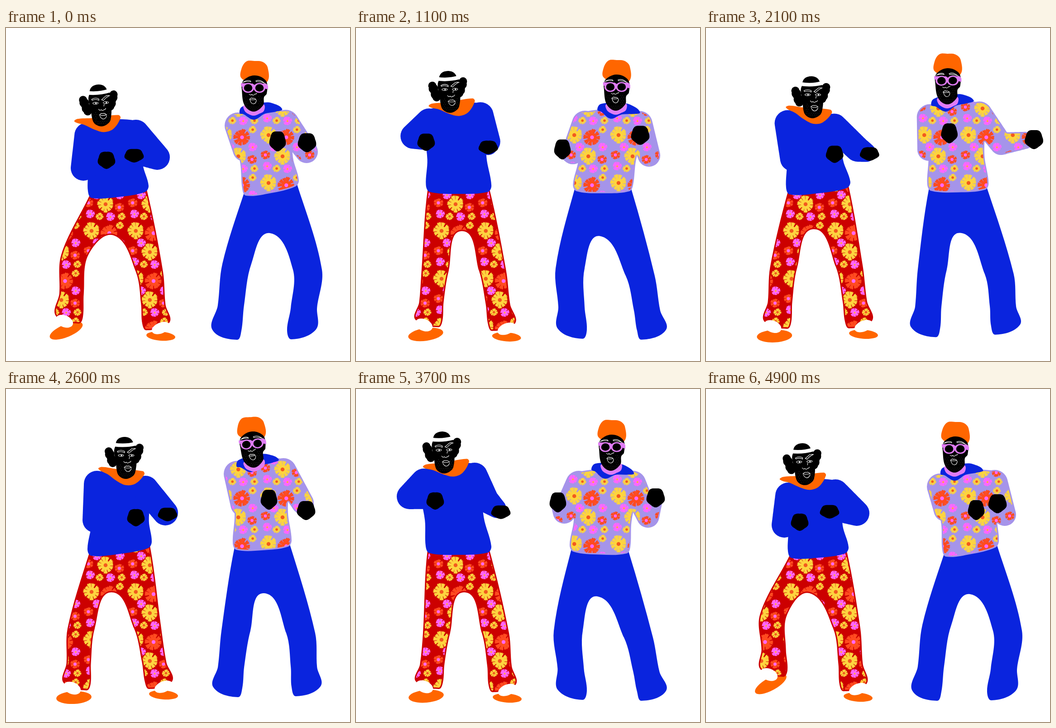
Animation of 760x737 px, one loop 5 s. Source, as an HTML page with a canvas:

```html
<!DOCTYPE html>
<html lang="en">
<head>
<meta charset="utf-8">
<title>Two dancers</title>
<style>
html, body { margin: 0; width: 100%; height: 100%; overflow: hidden; background: #fff; }
canvas { display: block; }
</style>
</head>
<body>
<canvas id="stage" width="760" height="737"></canvas>
<script>
const W = 760, H = 737, TAU = Math.PI * 2;
const ctx = document.getElementById('stage').getContext('2d');
const BLUE = '#0a24de', RED = '#cc0000', LILAC = '#a594ea', ORANGE = '#ff6600',
  YELLOW = '#fdd43f', CORAL = '#ff4b20', PINK = '#ff66ff', ORCHID = '#e07cf5';

// Each dancer is a skeleton: joint -> [[step, [x, y, tilt]], ...]. 0 is the left side, 1 the right.
const one = {}, two = {};
function pose(dancer, step, joints) {
  for (const name in joints) (dancer[name] = dancer[name] || []).push([step, joints[name]]);
}

pose(one, 0, {
  head: [207, 171, -.06], collar: [202, 202, -.12],
  shoulder0: [180, 238], elbow0: [171, 310], hand0: [222, 292],
  shoulder1: [287, 232], elbow1: [334, 286], hand1: [283, 282],
  waist0: [181, 373], waist1: [315, 361], crotch: [238, 459],
  knee0: [152, 502], ankle0: [140, 645], knee1: [317, 540], ankle1: [331, 660]
});
pose(one, 1, {
  head: [215, 166, -.05], collar: [214, 195, -.13],
  shoulder0: [182, 236], elbow0: [173, 301], hand0: [207, 294],
  shoulder1: [286, 229], elbow1: [333, 275], hand1: [273, 271],
  waist0: [181, 371], waist1: [315, 362], crotch: [229, 452],
  knee0: [149, 500], ankle0: [150, 628], knee1: [311, 530], ankle1: [325, 660]
});
pose(one, 6, {
  head: [248, 148, 0], collar: [240, 174, -.12],
  shoulder0: [205, 221], elbow0: [165, 251], hand0: [128, 279],
  shoulder1: [302, 203], elbow1: [314, 276], hand1: [240, 244],
  waist0: [159, 359], waist1: [301, 362], crotch: [223, 447],
  knee0: [161, 520], ankle0: [155, 642], knee1: [291, 525], ankle1: [320, 660]
});
pose(one, 13, {
  head: [192, 140, -.03], collar: [199, 166, -.16],
  shoulder0: [150, 205], elbow0: [118, 238], hand0: [175, 247],
  shoulder1: [262, 192], elbow1: [287, 245], hand1: [320, 272],
  waist0: [154, 360], waist1: [299, 360], crotch: [239, 450],
  knee0: [178, 540], ankle0: [162, 655], knee1: [308, 540], ankle1: [323, 662]
});
pose(one, 17, {
  head: [188, 154, 0], collar: [185, 178, .07],
  shoulder0: [149, 212], elbow0: [173, 285], hand0: [273, 264],
  shoulder1: [245, 210], elbow1: [300, 254], hand1: [368, 280],
  waist0: [168, 363], waist1: [310, 357], crotch: [245, 438],
  knee0: [180, 530], ankle0: [161, 655], knee1: [322, 525], ankle1: [337, 658]
});
pose(one, 24, {
  head: [263, 152, 0], collar: [255, 182, .08],
  shoulder0: [201, 210], elbow0: [197, 290], hand0: [287, 284],
  shoulder1: [308, 221], elbow1: [352, 274], hand1: [357, 277],
  waist0: [180, 366], waist1: [322, 350], crotch: [233, 450],
  knee0: [166, 530], ankle0: [157, 658], knee1: [313, 530], ankle1: [337, 655]
});

pose(two, 0, {
  head: [549, 133, 0], collar: [549, 185, 0],
  shoulder0: [512, 216], elbow0: [526, 270], hand0: [600, 250],
  shoulder1: [618, 210], elbow1: [664, 274], hand1: [665, 253],
  waist0: [522, 368], waist1: [647, 349], crotch: [583, 454],
  knee0: [510, 522], ankle0: [488, 676], knee1: [666, 535], ankle1: [653, 675]
});
pose(two, 1, {
  head: [551, 133, 0], collar: [551, 185, 0],
  shoulder0: [517, 216], elbow0: [528, 268], hand0: [597, 267],
  shoulder1: [638, 208], elbow1: [660, 278], hand1: [644, 253],
  waist0: [522, 368], waist1: [647, 349], crotch: [583, 454],
  knee0: [510, 522], ankle0: [488, 676], knee1: [666, 535], ankle1: [653, 675]
});
pose(two, 6, {
  head: [591, 139, 0], collar: [587, 191, .02],
  shoulder0: [533, 220], elbow0: [530, 291], hand0: [523, 299],
  shoulder1: [654, 219], elbow1: [652, 282], hand1: [566, 230],
  waist0: [511, 365], waist1: [641, 354], crotch: [570, 464],
  knee0: [496, 520], ankle0: [478, 673], knee1: [651, 540], ankle1: [653, 675]
});
pose(two, 13, {
  head: [565, 129, 0], collar: [553, 181, .18],
  shoulder0: [492, 210], elbow0: [460, 273], hand0: [446, 250],
  shoulder1: [612, 210], elbow1: [645, 282], hand1: [662, 240],
  waist0: [472, 357], waist1: [606, 362], crotch: [533, 459],
  knee0: [469, 535], ankle0: [478, 674], knee1: [624, 550], ankle1: [653, 676]
});
pose(two, 17, {
  head: [520, 131, 0], collar: [516, 183, .03],
  shoulder0: [471, 212], elbow0: [447, 289], hand0: [460, 214],
  shoulder1: [590, 208], elbow1: [638, 264], hand1: [725, 246],
  waist0: [470, 364], waist1: [611, 370], crotch: [544, 457],
  knee0: [481, 535], ankle0: [478, 674], knee1: [638, 550], ankle1: [658, 663]
});
pose(two, 20, {
  head: [530, 116, 0], collar: [526, 168, 0], elbow1: [650, 258], hand1: [736, 242]
});
pose(two, 24, {
  head: [545, 122, -.1], collar: [542, 166, -.07],
  shoulder0: [510, 188], elbow0: [521, 256], hand0: [581, 244],
  shoulder1: [613, 182], elbow1: [655, 252], hand1: [663, 268],
  waist0: [501, 353], waist1: [631, 347], crotch: [570, 452],
  knee0: [508, 535], ankle0: [490, 668], knee1: [651, 540], ankle1: [663, 666]
});

// Monotone cubic through the keys of one joint.
function sample(keys, t) {
  const last = keys.length - 1;
  let k = 0;
  while (k < last - 1 && t >= keys[k + 1][0]) k++;
  const slope = (j, i) => j < 0 || j >= last ? 0
    : (keys[j + 1][1][i] - keys[j][1][i]) / (keys[j + 1][0] - keys[j][0]);
  const tangent = (j, i) => {
    const a = slope(j - 1, i), b = slope(j, i);
    return a * b > 0 ? 2 * a * b / (a + b) : 0;
  };
  const [t0, p] = keys[k], [t1, q] = keys[k + 1], h = t1 - t0, u = (t - t0) / h;
  const s = u * u * (3 - 2 * u);
  return p.map((v, i) => v + (q[i] - v) * s
    + h * u * (1 - u) * ((1 - u) * tangent(k, i) - u * tangent(k + 1, i)));
}

function skeleton(dancer, t) {
  const joints = {};
  for (const name in dancer) joints[name] = sample(dancer[name], t);
  return joints;
}

const off = (p, dx, dy) => [p[0] + dx, p[1] + dy];
const mix = (p, q, u) => [p[0] + (q[0] - p[0]) * u, p[1] + (q[1] - p[1]) * u];

// Smooth closed outline through x, y pairs.
function blob(flat) {
  const path = new Path2D(), n = flat.length / 2;
  const at = i => [flat[(i + n) % n * 2], flat[(i + n) % n * 2 + 1]];
  const handle = (i, reach) => {
    const a = at(i - 1), b = at(i + 1), d = Math.hypot(b[0] - a[0], b[1] - a[1]) || 1;
    return off(at(i), (b[0] - a[0]) / d * reach, (b[1] - a[1]) / d * reach);
  };
  path.moveTo(...at(0));
  for (let i = 0; i < n; i++) {
    const p = at(i), q = at(i + 1), reach = Math.hypot(q[0] - p[0], q[1] - p[1]) / 3;
    path.bezierCurveTo(...handle(i, reach), ...handle(i + 1, -reach), ...q);
  }
  return path;
}

// Sleeve: circles swept along the joints.
function tube(points, radii) {
  const path = new Path2D();
  for (let i = 0; i < points.length - 1; i++)
    for (let u = 0; u <= 1; u += 1 / 24) {
      const [x, y] = mix(points[i], points[i + 1], u), r = radii[i] + (radii[i + 1] - radii[i]) * u;
      path.moveTo(x + r, y);
      path.arc(x, y, r, 0, TAU);
    }
  return path;
}

const sleeve = (j, side, radii) => {
  const elbow = j['elbow' + side], hand = j['hand' + side];
  return tube([j['shoulder' + side], elbow, mix(elbow, hand, .72)], radii);
};

function sweater(j, radii) {
  const { shoulder0: s0, shoulder1: s1, waist0: w0, waist1: w1 } = j, up = 2 - radii[0];
  const body = blob([
    off(s0, 0, up), off(s0, -12, 0), mix(s0, w0, .55), off(w0, 0, -12), off(w0, 8, 3),
    off(mix(w0, w1, .5), 0, 7), off(w1, -8, 2), off(w1, 0, -12), mix(s1, w1, .55),
    off(s1, 12, 0), off(s1, 0, up)
  ].flat());
  return [body, sleeve(j, 0, radii), sleeve(j, 1, radii)];
}

function trousers(j, w, drop) {
  const leg = (knee, ankle, side) => [
    off(knee, side * w, 0), off(mix(knee, ankle, .6), side * (w - 3), 0),
    off(ankle, side * w, -8), off(ankle, -side * w * .7, drop), off(ankle, -side * w, -6),
    off(mix(knee, ankle, .6), side * (3 - w), 0), off(knee, -side * w, 0)
  ];
  return blob([
    off(j.waist0, 22, -45), off(j.waist0, 4, -3), ...leg(j.knee0, j.ankle0, -1),
    j.crotch, ...leg(j.knee1, j.ankle1, 1).reverse(), off(j.waist1, -4, -3), off(j.waist1, -22, -45)
  ].flat());
}

function fill(path, color, c = ctx) {
  c.fillStyle = color;
  c.fill(path);
}

function oval(x, y, rx, ry, color, tilt = 0, c = ctx) {
  c.beginPath();
  c.ellipse(x, y, rx, ry, tilt, 0, TAU);
  c.fillStyle = color;
  c.fill();
}

function fist([x, y], rx, ry) {
  const points = [];
  for (let i = 0; i < 20; i++) {
    const a = i / 20 * TAU, r = 1 + .05 * Math.sin(a * 5);
    points.push(x + Math.cos(a) * rx * r, y + Math.sin(a) * ry * r);
  }
  fill(blob(points), '#000');
}

// Flower print, fixed to the stage.
function flower(c, x, y, r, petals, color, heart, heartR) {
  let seed = petals * 31 + 7;
  const rnd = () => (seed = seed * 16807 % 2147483647) / 2147483647;
  c.fillStyle = color;
  for (let i = 0; i < petals; i++) {
    const a = (i + .5 + (rnd() - .5) * .25) / petals * TAU - Math.PI / 2;
    const len = r * (.88 + rnd() * .2), w = 2.7 / petals;
    c.beginPath();
    c.moveTo(x, y);
    for (let k = 0; k < 6; k++) {
      const b = a + w * (k / 2.5 - 1), d = len * (k % 2 ? 1 : .9);
      c.lineTo(x + Math.cos(b) * d, y + Math.sin(b) * d);
    }
    c.fill();
  }
  oval(x, y, r * .55, r * .55, color, 0, c);
  oval(x, y, heartR, heartR, heart, 0, c);
}

function layer() {
  const canvas = document.createElement('canvas');
  canvas.width = W;
  canvas.height = H;
  return canvas.getContext('2d');
}

const print = layer(), mask = layer(), ink = layer();
const kinds = [
  [19, 11, YELLOW, '#f25a1e', 4.3, [[580, 237], [611, 284]]],
  [19, 10, CORAL, PINK, 4.2, [[521.5, 242]]],
  [10.5, 8, CORAL, PINK, 3.4, [[543.5, 291], [573, 281]]],
  [10.5, 7, PINK, '#fdb030', 2, [[545, 264], [592, 264], [577, 306], [524, 312]]],
  [8.8, 9, YELLOW, '#f25a1e', 2.8, [[598, 311], [549, 311], [545, 331]]]
];
for (let i = -6; i < 3; i++) for (let j = -2; j < 5; j++)
  for (const [r, n, color, heart, heartR, spots] of kinds)
    for (const [x, y] of spots) flower(print, x + i * 97.75, y + j * 106, r, n, color, heart, heartR);

// Flowered cloth with a plain edge: the print is cut by shifted copies of the mask.
function printed(paths, color) {
  mask.clearRect(0, 0, W, H);
  for (const path of paths) fill(path, color, mask);
  ctx.drawImage(mask.canvas, 0, 0);
  ink.globalCompositeOperation = 'copy';
  ink.drawImage(print.canvas, 0, 0);
  ink.globalCompositeOperation = 'destination-in';
  for (let a = 0; a < TAU; a += TAU / 8)
    ink.drawImage(mask.canvas, Math.cos(a) * 3, Math.sin(a) * 3);
  ctx.drawImage(ink.canvas, 0, 0);
}

function placed([x, y, tilt], draw) {
  ctx.save();
  ctx.translate(x, y);
  ctx.rotate(tilt);
  draw();
  ctx.restore();
}

function whiteLines(path) {
  ctx.strokeStyle = '#fff';
  ctx.lineWidth = 1.1;
  ctx.stroke(path);
}

function stubble(cx, top, bottom, half) {
  for (let y = top, row = 0; y < bottom; y += 4, row++)
    for (let x = -half + row % 2 * 2; x <= half; x += 4)
      if ((Math.abs(x) > 10 || y > bottom - 9) && Math.abs(x) < half - Math.max(0, y - bottom + 10) * .7)
        oval(cx + x, y, .45, .45, '#999');
}

const bigCollar = blob([-51,-1,-44,-6,-10,-4,47,-4,51,3,33,25,12,30,-9,22,-30,9]);
const longFace = blob([-22,-24,0,-28,24,-26,26,0,22,34,14,43,2,47,-10,43,-17,34,-20,12]);
const skullCap = new Path2D('M-21-28Q-20-46 0-46Q17-45 19-28Z');
const headband = new Path2D('M-26-25L-24-33Q0-29 22-35L25-27Q0-21-26-25Z');
const longFaceLines = new Path2D('M-17-14q8-5 16 0l0 3q-7-4-15-1zM5-12q5-4 10-8q5-1 8 0q-8 3-14 10z'
  + 'M-3 8q2 5 6 2q3 4 6 0q3 1 4-3M10-2l-1 5M-2 22q4-5 8-3q3-2 8 3q-8 2-16 0zM-1 24q3 7 8 7q5-1 7-7');

function bandedHead() {
  for (const side of [-1, 1]) for (let i = 0; i < 5; i++) {
    const r = 9 + i % 2 * 1.5;
    oval(side * (34 - i * 2.2) - 2, i * 6.5 - 18 - side * 4, r, r, '#000');
  }
  fill(skullCap, '#000');
  fill(longFace, '#000');
  fill(headband, '#fff');
  stubble(4, 16, 44, 18);
  for (const x of [-9, 14]) {
    oval(x, -5, 6.5, 2.8, '#fff');
    oval(x, -5, 5.3, 1.8, '#000');
    oval(x + 1, -5, 1.6, 1.6, '#fff');
  }
  whiteLines(longFaceLines);
}

const smallCollar = blob([-33,3,-27,-11,20,-20,38,-19,61,-6,48,0,22,5,-1,18,-24,6]);
const neck = blob([-23,38,20,36,21,50,10,57,-2,61,-14,57,-22,50]);
const cap = blob([-29,-22,-29,-42,-18,-59,0,-60,18,-58,29,-46,28,-14,0,-10]);
const beardedFace = blob([-27,-13,-15,-24,-1,-28,14,-25,27,-13,27,12,21,20,19,38,-2,52,-22,38,-28,4]);
const beardedLines = new Path2D('M-25-13q9-6 16-3l1 2q-9-2-17 1zM3-16q8-3 15 2l4 3q-10-4-18-3z'
  + 'M-12 13q3 4 6 1q4 4 7-1q3 1 4-2M-11 25q4-5 7-2q3-2 7 2q-7 2-14 0zM-10 26q2 9 8 9q6-1 6-9');
const frames = new Path2D('M-30-11L-4-10L0-7L5-10L26-10L30-5L30 3L23 1L-26-2L-30-5Z');

function cappedHead() {
  fill(neck, ORCHID);
  fill(cap, ORANGE);
  fill(beardedFace, '#000');
  stubble(-3, 18, 50, 20);
  whiteLines(beardedLines);
  fill(frames, ORCHID);
  for (const x of [-14, 11]) {
    oval(x, -.5, 13, 11, ORCHID);
    oval(x, -.5, 9.3, 8.3, '#000');
  }
}

function drawOne(j) {
  const { ankle0: [x0, y0], ankle1: [x1, y1] } = j;
  const lift = Math.max(-.5, Math.min(-.05, (y0 - 658) * .03));
  oval(x0 - 7, y0 + 25, 39, 14, ORANGE, lift);
  oval(x1 + 11, y1 + 22, 32, 10, ORANGE, .08);
  printed([trousers(j, 30, 9)], RED);
  oval(x0 - 11, y0 + 4, 20, 13, '#fff', .4);
  oval(x1 + 11, y1 + 4, 21, 12, '#fff', -.4);
  for (const path of sweater(j, [29, 28, 21])) fill(path, BLUE);
  placed(j.collar, () => fill(bigCollar, ORANGE));
  placed(j.head, bandedHead);
  fist(j.hand0, 19, 19);
  fist(j.hand1, 21, 15);
}

function drawTwo(j) {
  fill(trousers(j, 32, 14), BLUE);
  printed(sweater(j, [29, 25, 19]), LILAC);
  placed(j.collar, () => fill(smallCollar, BLUE));
  placed(j.head, cappedHead);
  fist(j.hand0, 18, 22);
  fist(j.hand1, 20, 21);
}

function draw(t) {
  ctx.fillStyle = '#fff';
  ctx.fillRect(0, 0, W, H);
  drawOne(skeleton(one, t));
  drawTwo(skeleton(two, t));
}

// Ten steps a second; the dance runs forward, then back.
const start = performance.now();
let shown = 0;
function tick(now) {
  const step = Math.floor(Math.max(0, now - start) / 100) % 50;
  const t = Math.min(step, 50 - step, 24);
  if (t !== shown) draw(shown = t);
  requestAnimationFrame(tick);
}
draw(0);
requestAnimationFrame(tick);
</script>
</body>
</html>
```
